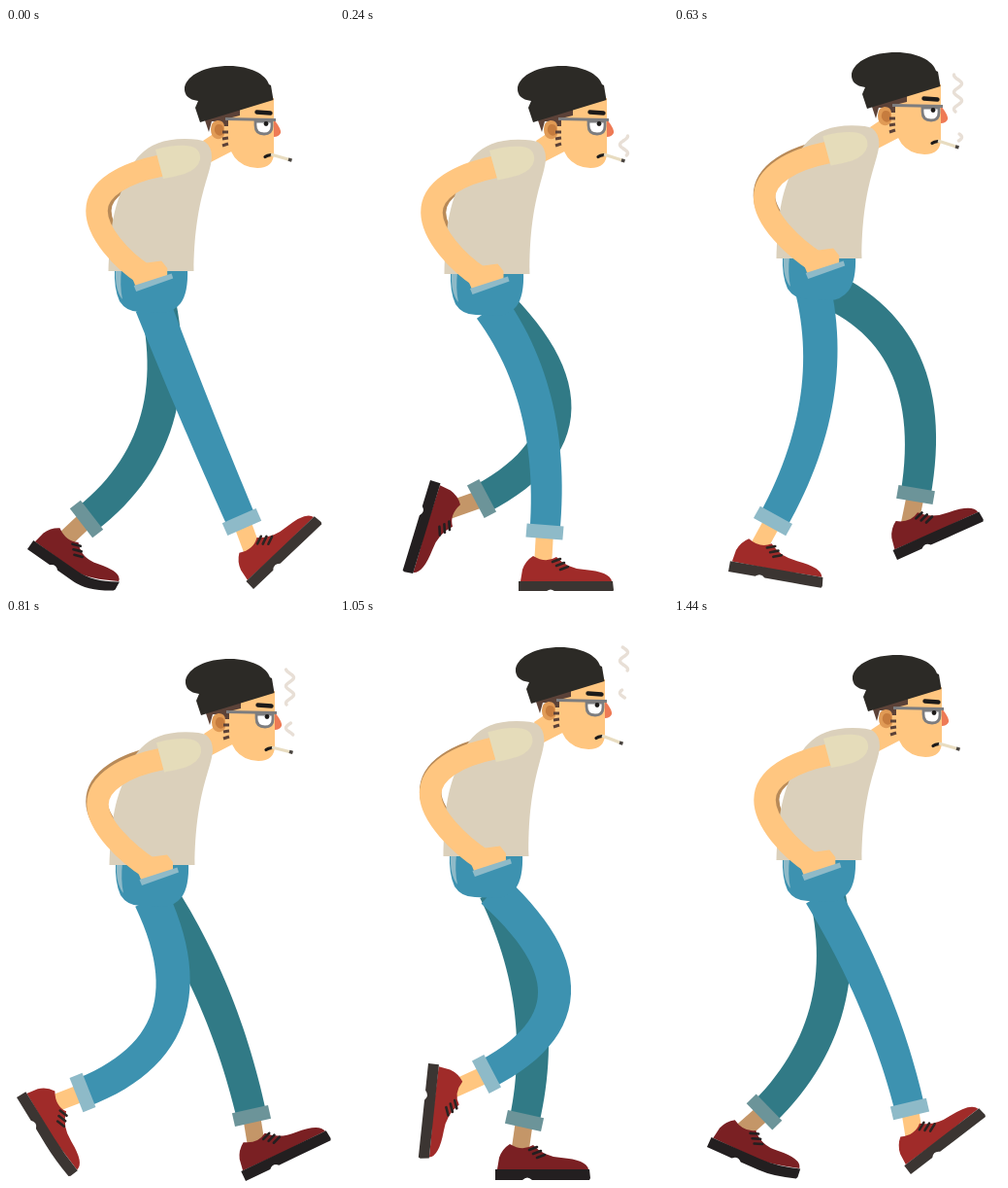
These frames come from a looping animation (338 px wide and 579 px high, 1.47 s). An HTML page with a canvas:

```html
<!DOCTYPE html>
<html lang="en">
<head>
<meta charset="utf-8">
<title>Walk cycle</title>
<style>
html, body { margin: 0; width: 100%; height: 100%; overflow: hidden; background: #fff; }
canvas { display: block; width: 338px; height: 579px; }
</style>
</head>
<body>
<canvas id="stage"></canvas>
<script>
const W = 338, H = 579, LOOP = 1470, STEP = 30, HALF = LOOP / 2;
const canvas = document.getElementById('stage');
const ctx = canvas.getContext('2d');
const dpr = window.devicePixelRatio || 1;
canvas.width = Math.round(W * dpr);
canvas.height = Math.round(H * dpr);

const SKIN = '#ffc680', DARK = '#2c2a26', CUFF = '#8ebac8', JEANS = '#3d92b0';
const NEAR = { jeans: JEANS, cuff: CUFF, skin: SKIN, shoe: '#a02b29', sole: '#3b3532', lace: '#2b2422' };
const FAR = { jeans: '#317a86', cuff: '#6c9499', skin: '#c49668', shoe: '#7a2023', sole: '#231f20', lace: '#231f20' };

// time, hip x, knee x y, cuff x y, heel x y, shoe angle
const STRIDE = [
  [0, 151, 196, 397, 243, 508, 255, 577, -43.5],
  [105, 151, 206, 393, 243, 511, 237, 578, -25.5],
  [240, 156, 203, 392, 211, 518, 184, 580, 0],
  [345, 151, 186, 397, 180, 516, 150, 577, 0],
  [525, 142, 133, 392, 122, 512, 94, 573, 2],
  [630, 144, 146, 388, 102, 507, 56, 559, 10],
  [735, 148, 146, 405, 83, 507, 24, 543, 24],
  [765, 147, 143, 410, 73, 505, 12, 536, 35],
  [810, 150, 166, 410, 79, 487, 11, 492, 58.4],
  [1005, 155, 211, 398, 136, 484, 83, 465, 107],
  [1050, 158, 221, 385, 151, 468, 91, 457, 96],
  [1230, 158, 235, 362, 200, 462, 141, 497, 36],
  [1395, 155, 231, 352, 239, 480, 220, 547, -24],
  [1440, 152, 207, 393, 243, 504, 244, 571, -37.5]
];
// time, hem dx dy, head dx dy (repeats every step)
const BOB = [
  [0, 0, 0, 0, 0],
  [75, 1, 3, 1, 2],
  [240, 2, 3, -1, 0],
  [315, 1, -6, -3, -10],
  [495, 0, -16, -5, -21],
  [630, 0, -13, -1, -14],
  [705, 0, -2, 0, -2]
];
// time, top, bottom, wave position
const WISP_A = [
  [90, 132, 132, 134], [120, 131, 131, 132], [240, 111, 131, 120], [630, 62, 100, 80],
  [810, 50, 86, 67], [1050, 39, 63, 53], [1230, 32, 45, 47], [1350, 28, 29, 44], [1440, 27, 28, 43]
];
const WISP_B = [
  [570, 133, 133, 140], [630, 123, 130, 135], [810, 105, 117, 110],
  [1050, 83, 91, 86], [1230, 67, 69, 64], [1320, 62, 62, 60]
];

// Smooth periodic curve through the rows
function sample(rows, period, time) {
  const t = ((time % period) + period) % period, n = rows.length;
  let i = n - 1;
  for (let k = 0; k < n; k++) if (rows[k][0] <= t) i = k;
  if (t < rows[0][0]) i = -1;
  const row = k => rows[((k % n) + n) % n];
  const at = k => row(k)[0] + Math.floor(k / n) * period;
  const t0 = at(i), h = at(i + 1) - t0, s = (t - t0) / h;
  const slope = (k, c) => {
    const hl = at(k) - at(k - 1), hr = at(k + 1) - at(k);
    const sl = (row(k)[c] - row(k - 1)[c]) / hl, sr = (row(k + 1)[c] - row(k)[c]) / hr;
    return (sl * hr + sr * hl) / (hl + hr);
  };
  return row(i).map((a, c) => {
    const b = row(i + 1)[c], s2 = s * s, s3 = s2 * s;
    return a * (2 * s3 - 3 * s2 + 1) + b * (3 * s2 - 2 * s3) +
      h * (slope(i, c) * (s3 - 2 * s2 + s) + slope(i + 1, c) * (s3 - s2));
  }).slice(1);
}

function fill(d, color) {
  ctx.fillStyle = color;
  ctx.fill(new Path2D(d));
}
function line(d, color, width, cap = 'butt') {
  ctx.strokeStyle = color;
  ctx.lineWidth = width;
  ctx.lineCap = cap;
  ctx.stroke(new Path2D(d));
}
function group(draw, ...m) {
  ctx.save();
  ctx.transform(...m);
  draw();
  ctx.restore();
}
const shift = (x, y, draw) => group(draw, 1, 0, 0, 1, x, y);

function turned(x, y, a, draw) {
  const c = Math.cos(a), s = Math.sin(a);
  group(draw, c, s, -s, c, x, y);
}

function shoe(p, bend) {
  const b = -11 - bend;
  fill(`M2-11L4-23Q7-32 15-37Q28-29 39-36Q50-24 68 ${-23 - bend * .4}Q94 ${-21 - bend} 96 ${b}Q70-11 55-10Z`, p.shoe);
  fill(`M0-11L55-11Q75-11 97 ${b}L98 ${b + 9}L97 ${b + 11}Q75 0 58 0L38 0Q33-5 28 0L0 0Z`, p.sole);
  line('M35-31L43-34M39-27L47-30M43-23L51-26', p.lace, 2.6, 'round');
}

function leg(p, time, dx, hipY) {
  const [hx, mx, my, cx, cy, sx, sy, deg] = sample(STRIDE, LOOP, time);
  const phase = ((time % LOOP) + LOOP) % LOOP;
  const bend = 16 * Math.exp(-(((phase - 765) / 35) ** 2));
  const qx = 2 * mx - (hx + cx) / 2, qy = 2 * my - (hipY + cy) / 2;
  const ang = deg * Math.PI / 180, c = Math.cos(ang), s = Math.sin(ang);
  shift(dx, 0, () => {
    line(`M${cx} ${cy}L${sx + 25 * c + 26 * s} ${sy + 25 * s - 26 * c}`, p.skin, 18);
    turned(sx, sy, ang, () => shoe(p, bend));

    const left = [], right = [];
    for (let i = 0; i <= 28; i++) {
      const t = i / 28, u = 1 - t;
      const x = u * u * hx + 2 * u * t * qx + t * t * cx;
      const y = u * u * hipY + 2 * u * t * qy + t * t * cy;
      const vx = u * (qx - hx) + t * (cx - qx), vy = u * (qy - hipY) + t * (cy - qy);
      const k = (18.5 - 3 * t) / Math.hypot(vx, vy);
      left.push(`${x - vy * k} ${y + vx * k}`);
      right.unshift(`${x + vy * k} ${y - vx * k}`);
    }
    fill('M' + left.concat(right).join('L') + 'Z', p.jeans);
    turned(cx, cy, Math.atan2(cy - qy, cx - qx), () => fill('M-7-19H7V19H-7Z', p.cuff));
  });
}

function wisp(rows, time, from, to, x0) {
  if (time <= from || time >= to) return;
  const [top, bottom, crest] = sample(rows, LOOP, time);
  const pts = [], n = 40;
  for (let i = 0; i <= n; i++) {
    const y = top + (bottom - top) * i / n;
    pts.push(`${x0 - 4 * Math.cos(2 * Math.PI * (y - crest) / 17.5)} ${y}`);
  }
  line('M' + pts.join('L'), '#e8dfd6', 3.4, 'round');
}

function head(time, dx) {
  const tip = 136 - .7 * dx;
  fill('M203 116L227 100L242 122L211 138Z', SKIN);
  fill('M224 84L276 72V128Q276 144 259 144Q228 143 226 100Z', SKIN);
  fill('M276 94Q284 104 283 108Q281 112 276 112Z', '#ee7a55');
  fill('M204 92L241 80V90L229 93V101H223V97L212 96L209 107Z', '#5c4238');
  fill('M218 95Q225 95 225 102V110Q222 115 217 114Q211 112 211 104Q211 96 218 95Z', '#e09a55');
  fill('M219 99Q224 99 224 104V109Q221 112 218 110Q214 107 215 103Q216 99 219 99Z', '#c67c3e');
  line('M223 107H229M223 114L229 113M223 121L229 119', '#5c4238', 3);
  fill('M257 96H274V101Q274 109 266 109Q257 109 257 100Z', '#fff');
  line('M257 96H274V101Q274 109 266 109Q257 109 257 100Z', '#7d7d7f', 2.8);
  line('M226 93.5L278 94.5', '#7d7d7f', 3);
  ctx.fillStyle = '#1d1b1a';
  ctx.beginPath();
  ctx.arc(268, 98.5, 2.4, 0, 7);
  ctx.fill();
  line('M258.5 86.5L272.5 87.5', '#1d1b1a', 4.4, 'round');
  line('M267 132.5Q269 131 273 130.5', '#1d1b1a', 3.2, 'round');
  line(`M273 130L294 ${tip}`, '#e8dcc0', 3.2);
  line(`M291 ${tip - .9}L294.5 ${tip + .1}`, '#4a4541', 3.4);
  fill('M195 82L198 75Q183 73 184 61C187 48 205 39 230 39C252 39 268 48 271 58L273 59L275.5 74L200 97Z', DARK);
  wisp(WISP_A, time, 120, 1350, 292.5 - dx);
  wisp(WISP_B, time, 590, 1290, 292.5 - dx);
}

function pelvis() {
  fill('M112 247H187Q188 272 180 283Q172 293 160 293L138 292Q124 292 117 281Q111 268 112 247Z', JEANS);
  fill('M113 248H119Q117 265 120 279Q112 270 113 248Z', CUFF);
}

function draw(time) {
  const [bx, by, hx, hy] = sample(BOB, HALF, time);
  const wave = Math.cos(2 * Math.PI * (time - 90) / LOOP);
  const sway = 2.5 - 2.5 * wave;
  // torso leans and stretches between hem and head
  const a = (bx - hx) / 180, b = (by - hy) / 180;
  const torso = fn => group(fn, 1, 0, a, 1 + b, bx - a * 250, by - b * 250);
  const arm = `M160 141.5C122 149 93.5 165 93.5 188C93.5 210 ${118 + sway} 238 ${143 + sway} 254`;

  ctx.setTransform(dpr, 0, 0, dpr, 0, 0);
  ctx.fillStyle = '#fff';
  ctx.fillRect(0, 0, W, H);

  torso(() => shift(1.5 + 2.5 * wave, -1.5 + 1.5 * wave, () => line(arm, '#b88a58', 22.5)));
  leg(FAR, time - HALF + 30, 10, 285 + by);
  leg(NEAR, time, 0, 285 + by);
  shift(bx, by, pelvis);
  shift(hx, hy, () => head(time, hx));
  torso(() => {
    fill('M105.5 250C107 215 109 190 120 165C128 140 140 114 184 114Q200 114 205 117Q212 122 212 133C211 152 194 176 193.5 250Z', '#dbd0bb');
    line(arm, SKIN, 22.5);
    fill('M154 125Q172 120 186 121Q201 122 200 135Q198 145 184 150Q174 153 162 155Z', '#e5dcba');
  });
  shift(bx + sway, by, () => {
    fill('M128 253L141 242L160 239.5L166 247V257L134 267Z', SKIN);
    fill('M131.5 265L170.5 252.5L172 257.5L134 271Z', CUFF);
  });
}

const start = performance.now();
function tick() {
  const t = (performance.now() - start) % LOOP;
  draw(Math.floor(t / STEP) * STEP);
  requestAnimationFrame(tick);
}
tick();
</script>
</body>
</html>
```
